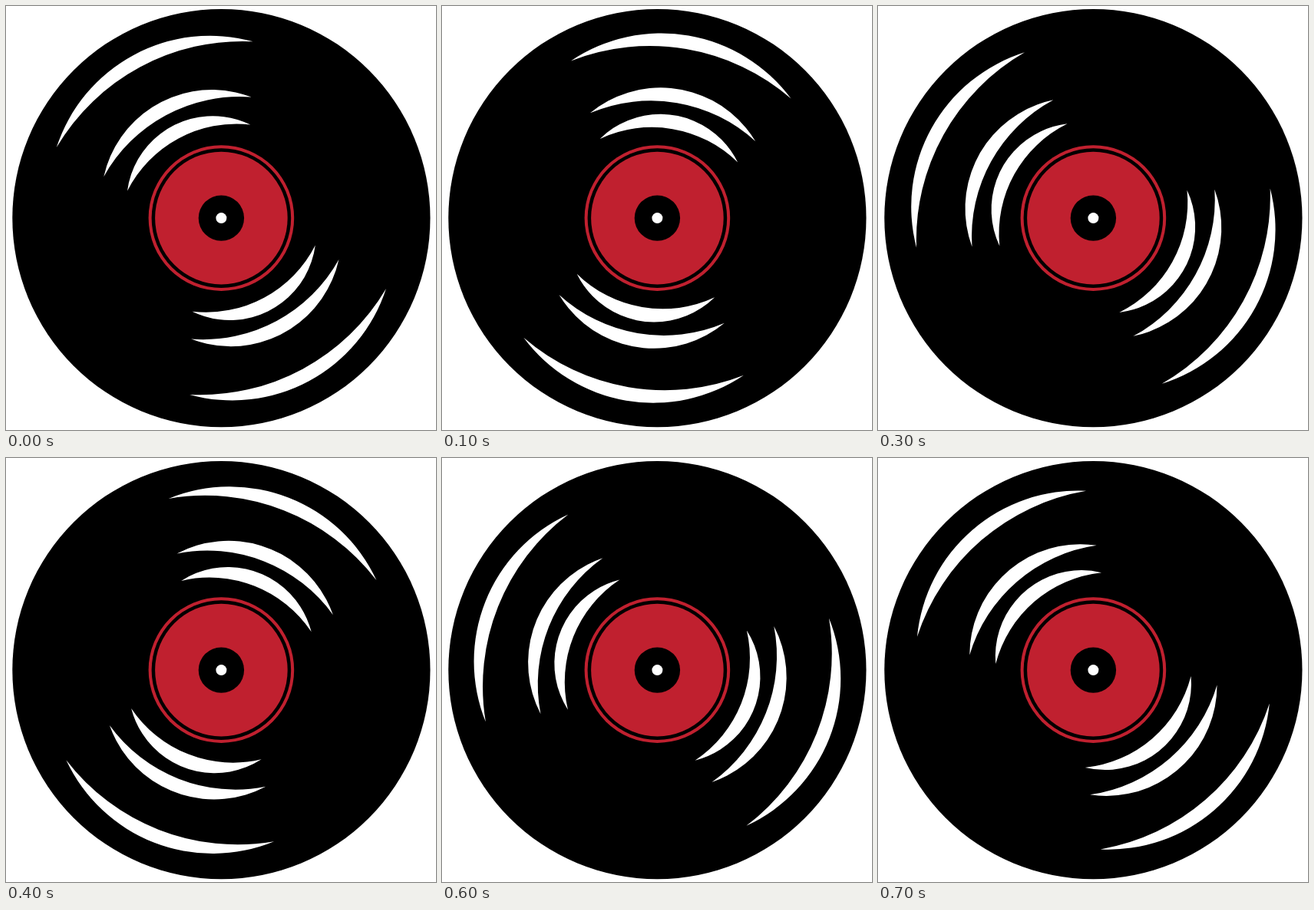
Write an HTML page with a canvas that moves like this. It is 560x552 px and loops after 800 ms.

```html
<!DOCTYPE html>
<html lang="en">
<head>
<meta charset="utf-8">
<title>Spinning record</title>
<style>
html, body { margin: 0; width: 100%; height: 100%; overflow: hidden; background: #fff; }
canvas { display: block; }
</style>
</head>
<body>
<canvas id="stage" width="560" height="552"></canvas>
<script>
const ctx = document.getElementById('stage').getContext('2d');
const CX = 280.4, CY = 276.1;
const STEP = 100;
const RED = '#c0202f';

// Rotation of the shines at each step, in degrees
const TURNS = [0, 38, 85.7, 147.3, 229.7, 268, 320, 347.5];
const REST = 241.7;

// Tip radius, half span in degrees, centre offsets of the outer and inner edge
const SHINES = [
  { r: 233.5, half: 38.5, outer: 30.5, inner: -58 },
  { r: 162.3, half: 42.3, outer: 26, inner: -50 },
  { r: 127.4, half: 45.6, outer: 23.5, inner: -42 }
];

const rad = deg => deg * Math.PI / 180;

function disc(r, color) {
  ctx.fillStyle = color;
  ctx.beginPath();
  ctx.arc(0, 0, r, 0, Math.PI * 2);
  ctx.fill();
}

// Crescent between two arcs that meet at the same tips, facing +x
function crescent({ r, half, outer, inner }) {
  const x = r * Math.cos(rad(half));
  const y = r * Math.sin(rad(half));
  const edge = (cx, reverse) => {
    const a = Math.atan2(y, x - cx);
    ctx.arc(cx, 0, Math.hypot(x - cx, y), reverse ? a : -a, reverse ? -a : a, reverse);
  };
  ctx.beginPath();
  edge(outer, false);
  edge(inner, true);
  ctx.closePath();
  ctx.fill();
}

function draw(turn) {
  ctx.setTransform(1, 0, 0, 1, 0, 0);
  ctx.fillStyle = '#fff';
  ctx.fillRect(0, 0, 560, 552);

  ctx.translate(CX, CY);
  disc(272.1, '#000');
  disc(94.8, RED);
  disc(90.8, '#000');
  disc(86.3, RED);
  disc(29.7, '#000');
  disc(7, '#fff');

  ctx.rotate(rad(REST + turn));
  for (let side = 0; side < 2; side++) {
    SHINES.forEach(crescent);
    ctx.rotate(Math.PI);
  }
}

function tick() {
  const step = Math.floor(performance.now() / STEP) % TURNS.length;
  draw(TURNS[step]);
  requestAnimationFrame(tick);
}
tick();
</script>
</body>
</html>
```
